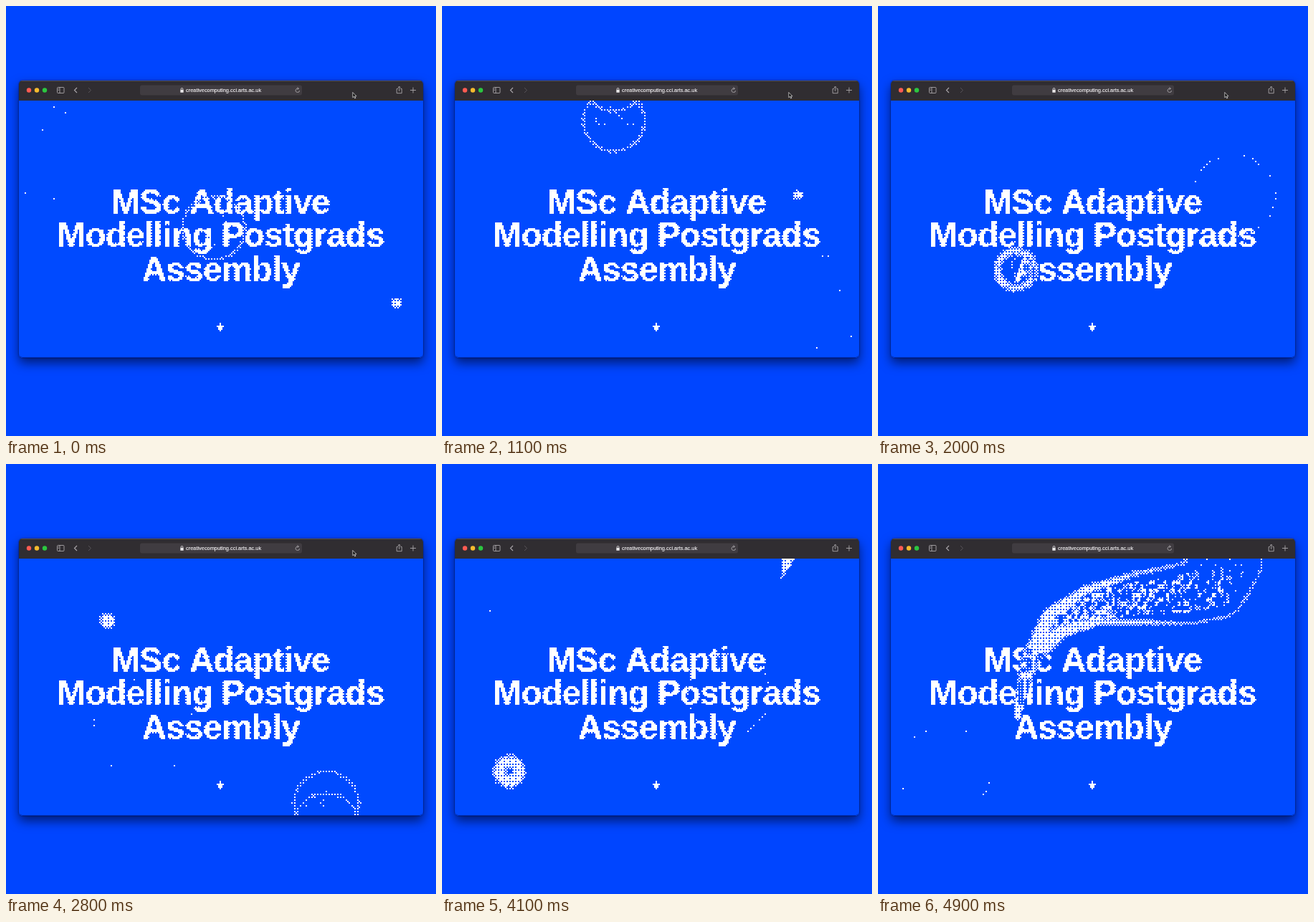
These frames come from a looping animation (600 by 600 pixels, 5 s). An HTML page with a canvas:

```html
<!DOCTYPE html>
<html lang="en">
<head>
<meta charset="utf-8">
<title>Showcase window</title>
<style>
  html, body { margin: 0; width: 100%; height: 100%; overflow: hidden; background: #0045ff; }
  .stage { position: relative; width: 600px; height: 600px; overflow: hidden; background: #0045ff; }
  .window {
    position: absolute; left: 18px; top: 104px; width: 564px; height: 387px;
    border-radius: 5px; overflow: hidden; background: #004aff;
  }
  .shadow {
    position: absolute; left: 18px; top: 104px; width: 564px; height: 387px; border-radius: 5px;
    box-shadow: 0 7px 15px rgba(0, 0, 25, .6), 0 0 2px rgba(0, 0, 20, .7);
  }
  canvas { position: absolute; left: 0; top: 28px; width: 564px; height: 358px; image-rendering: pixelated; }
  .bar { position: absolute; left: 0; top: 0; }
  .edge { position: absolute; inset: 0; border-radius: 5px; box-shadow: inset 0 -1px 0 rgba(0, 20, 110, .6); }
  .bar text { font: 7.4px "Liberation Sans", Arial, sans-serif; fill: #f3f1f3; }
</style>
</head>
<body>
<div class="stage">
  <div class="shadow"></div>
  <div class="window">
    <canvas id="water" width="282" height="179"></canvas>
    <svg class="bar" width="564" height="28" viewBox="18 104 564 28" fill="none" stroke="#aaa6aa" stroke-width=".9">
      <rect x="18" y="104" width="564" height="28" fill="#302d31" stroke="none"/>
      <path d="M18 104.5H582" stroke="#555157" stroke-width="1"/>
      <g stroke="none">
        <circle cx="32" cy="117.5" r="3.2" fill="#ff5b52"/>
        <circle cx="43" cy="117.5" r="3.2" fill="#f6bb2e"/>
        <circle cx="54" cy="117.5" r="3.2" fill="#2bc740"/>
        <rect x="187" y="110.5" width="226" height="14" rx="3" fill="#403c41"/>
      </g>
      <rect x="71.5" y="113.5" width="9.5" height="8" rx="1"/>
      <path d="M75 113.5v8M72.7 115.5h1.2M72.7 117.5h1.2"/>
      <path d="M99 114l-3.5 3.5 3.5 3.5" stroke-width="1.1"/>
      <path d="M115 114l3.5 3.5-3.5 3.5" stroke="#5c585d"/>
      <rect x="243.3" y="117" width="4.4" height="3.8" rx=".6" fill="#e8e6e8" stroke="none"/>
      <path d="M244.2 117v-1.2a1.3 1.3 0 0 1 2.6 0v1.2" stroke="#e8e6e8"/>
      <text x="251" y="120.2" stroke="#f3f1f3" stroke-width=".15">creativecomputing.cci.arts.ac.uk</text>
      <path d="M409.6 118a2.7 2.7 0 1 1-1.4-2.6M406.7 113.4l1.8 2-2.2 1"/>
      <path d="M547 115.5h-1.8v6.2h7v-6.2h-1.8M548.7 119v-6.6M546.7 114.2l2-2 2 2"/>
      <path d="M564 117.5h8M568 113.5v8"/>
      <path id="cursor" d="M483.8 120.5v7.2l1.7-1.5 1.2 2.7 1.2-.5-1.2-2.6h2.3z" fill="#111" stroke="#eee" stroke-width=".7"/>
    </svg>
    <div class="edge"></div>
  </div>
</div>
<script>
const LOOP = 5000, STEP = 100, CELL = 2;
const LEFT = 18, TOP = 132, RIGHT = 582, BOTTOM = 490;
const TITLE = ["MSc Adaptive", "Modelling Postgrads", "Assembly"];
const CURSOR_GONE = 3950;

// birth ms, x, y
const DROPS = [
  [-1250, 45, 205], [-740, 290, 310], [-119, 545, 414], [378, 240, 160],
  [995, 497, 264], [1506, 192, 368], [2022, 447, 475], [2626, 142, 219],
  [3083, 400, 322], [3750, 94, 429]
];
const STROKE = [
  [3985, 483, 134], [4120, 470, 170], [4190, 435, 180], [4300, 365, 187],
  [4440, 300, 197], [4540, 250, 220], [4700, 214, 268], [4770, 201, 315], [4840, 193, 358]
];
const BAYER = [0, 8, 2, 10, 12, 4, 14, 6, 3, 11, 1, 9, 15, 7, 13, 5];

const canvas = document.getElementById("water");
const cursor = document.getElementById("cursor");
const ctx = canvas.getContext("2d", { willReadFrequently: true });
const W = canvas.width, H = canvas.height;
const wave = new Float32Array(W * H);
const image = ctx.createImageData(W, H);

function drawPage() {
  ctx.save();
  ctx.scale(1 / CELL, 1 / CELL);
  ctx.translate(-LEFT, -TOP);
  ctx.fillStyle = "#fff";
  ctx.font = 'bold 48px "Liberation Sans", Arial, sans-serif';
  ctx.letterSpacing = "-0.8px";
  ctx.textAlign = "center";
  ctx.filter = "blur(0.5px)";
  TITLE.forEach((line, i) => ctx.fillText(line, 299.5, 289 + i * 47.3));
  ctx.filter = "none";
  ctx.fillRect(298, 442, 2, 12);
  ctx.fillRect(294, 446, 10, 2);
  ctx.fillRect(296, 448, 6, 4);
  ctx.restore();
  const data = ctx.getImageData(0, 0, W, H).data;
  return Float32Array.from({ length: W * H }, (_, i) => Math.min(1, data[i * 4 + 3] / 215));
}

function hash(x, y) {
  const v = Math.sin(x * 127.1 + y * 311.7) * 43758.5453;
  return v - Math.floor(v);
}

const radius = age => 150 * (1 - Math.exp(-age / 1920));

// Strength of a ripple of radius r at distance d from its centre
function ripple(d, r, x, y, gain, core) {
  const width = Math.min(r * .85, 4 + Math.max(0, 46 - r) * .3);
  const crest = Math.max(0, r - 1.1 * width);
  const power = gain * Math.min(1, .2 + .8 * Math.exp((25 - r) / 22));
  let h = power * Math.exp(-(((d - crest) / width) ** 2));
  if (d < r * .6 && r < 70) {
    h = Math.max(h, core * (1 - r / 70) * hash(x >> 1, Math.floor(y / 3)) ** 2);
  }
  return Math.min(.8, h * 1.6 - .4);
}

function raise(x, y, h) {
  const i = y * W + x;
  if (h > wave[i]) wave[i] = h;
}

function addRing(cx, cy, r) {
  const x0 = Math.max(0, Math.floor((cx - r - LEFT) / CELL));
  const x1 = Math.min(W - 1, Math.ceil((cx + r - LEFT) / CELL));
  const y0 = Math.max(0, Math.floor((cy - r - TOP) / CELL));
  const y1 = Math.min(H - 1, Math.ceil((cy + r - TOP) / CELL));
  for (let y = y0; y <= y1; y++) {
    for (let x = x0; x <= x1; x++) {
      const dx = LEFT + (x + .5) * CELL - cx, dy = TOP + (y + .5) * CELL - cy;
      const d = Math.hypot(dx, dy);
      if (d > r) continue;
      const gain = r > 55 ? .9 + .13 * Math.sin(5 * Math.atan2(dy, dx) + cx) : 1;
      raise(x, y, ripple(d, r, x, y, gain, 1.15));
    }
  }
}

// The four walls send each ring back
function addDrop(x, y, age) {
  const r = radius(age);
  if (r > 84) return;
  addRing(x, y, r);
  addRing(2 * LEFT - x, y, r);
  addRing(2 * RIGHT - x, y, r);
  addRing(x, 2 * TOP - y, r);
  addRing(x, 2 * BOTTOM - y, r);
}

function strokeSamples(t) {
  const out = [], parts = 7;
  for (let i = 0; i < STROKE.length - 1; i++) {
    for (let k = 0; k < parts; k++) {
      const [born, x, y] = STROKE[i].map((v, j) => v + (STROKE[i + 1][j] - v) * k / parts);
      if (born < t) out.push({ x, y, r: radius(t - born) });
    }
  }
  return out;
}

function addStroke(t) {
  const samples = strokeSamples(t);
  if (!samples.length) return;
  for (let y = 0; y < H; y++) {
    for (let x = 0; x < W; x++) {
      const px = LEFT + (x + .5) * CELL, py = TOP + (y + .5) * CELL;
      let depth = 0, r = 0;
      for (const s of samples) {
        const q = s.r - Math.hypot(px - s.x, py - s.y);
        if (q > depth) { depth = q; r = s.r; }
      }
      if (depth > 0) raise(x, y, ripple(r - depth, r, x, y, 1.15, 3));
    }
  }
}

const page = drawPage();

function render(t) {
  wave.fill(0);
  for (const [born, x, y] of DROPS) if (t > born) addDrop(x, y, t - born);
  addStroke(t);
  for (let y = 0, i = 0; y < H; y++) {
    for (let x = 0; x < W; x++, i++) {
      const level = (BAYER[(y & 3) * 4 + (x & 3)] + .5) / 16;
      const lit = Math.abs(page[i] - wave[i]) > level;
      image.data.set(lit ? [255, 255, 255, 255] : [0, 74, 255, 255], i * 4);
    }
  }
  ctx.putImageData(image, 0, 0);
  cursor.style.display = t < CURSOR_GONE ? "" : "none";
}

const start = performance.now();
let shown = -1;
function tick() {
  const t = Math.floor((performance.now() - start) % LOOP / STEP) * STEP;
  if (t !== shown) render(shown = t);
  requestAnimationFrame(tick);
}
tick();
</script>
</body>
</html>
```
